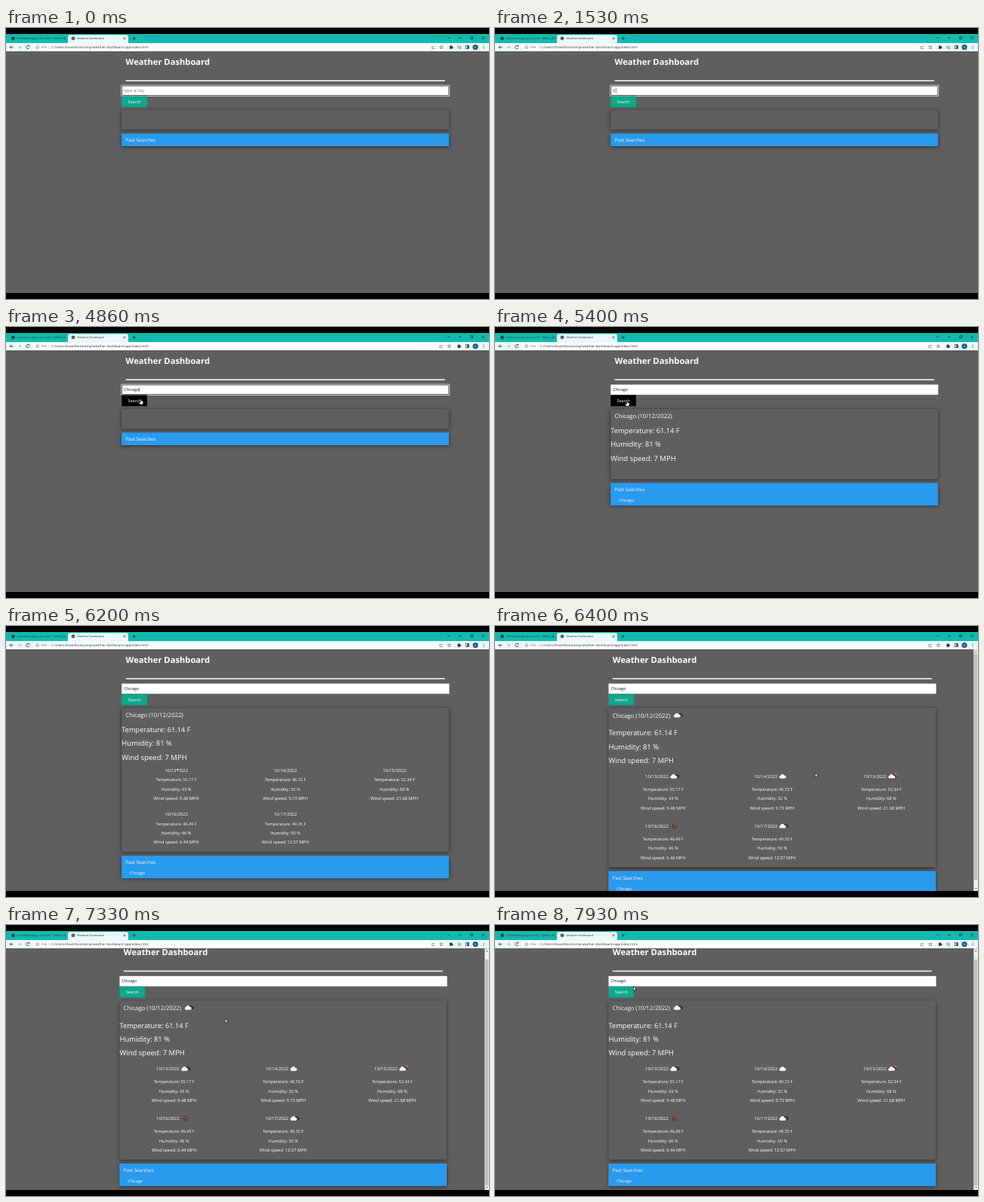
Write an HTML page with a canvas that moves like this. It is 640 by 360 pixels and loops after 8000 ms.

```html
<!DOCTYPE html>
<html lang="en">
<head>
<meta charset="utf-8">
<title>Weather Dashboard</title>
<style>
html, body { margin: 0; width: 100%; height: 100%; overflow: hidden; background: #000; }
canvas { display: block; width: 640px; height: 360px; }
</style>
</head>
<body>
<canvas id="stage" width="640" height="360"></canvas>
<script>
const ctx = document.getElementById('stage').getContext('2d');
const LOOP = 8000;
const PAGE = '#605f60', BLUE = '#2a9aee', TEAL = '#0ea88a', FRAME = '#13b9ae', BAR = '#ebf9f8', INK = '#333b3e';
const FONT = '"Open Sans", "Noto Sans", sans-serif';

// Times (ms) at which things happen
const KEYS = [1530, 2000, 2060, 2260, 3200, 3400, 3660];
const CARET = [530, 1060, 1530, 2800, 3200, 4260, 4790, 5400];
const HOVER = 4800, CLICK = 5400, FORECAST = 5730, ICONS = 6400;
const POINTER = [
  [4660, 198, 84], [4930, 175, 98], [5680, 175, 98], [6200, 226, 188],
  [6530, 526, 199], [6800, 526, 199], [7600, 206, 98], [7930, 183.5, 81.5]
];

const DAYS = [
  ['10/13/2022', '55.17', '43', '9.48', 'broken'],
  ['10/14/2022', '46.72', '32', '9.73', 'cloud'],
  ['10/15/2022', '52.34', '68', '21.68', 'rain'],
  ['10/16/2022', '46.49', '46', '6.44', 'clear'],
  ['10/17/2022', '49.35', '50', '12.57', 'broken']
];

const ease = p => p * p * (3 - 2 * p);
const clamp = p => Math.min(1, Math.max(0, p));

function rect(x, y, w, h, color) {
  ctx.fillStyle = color;
  ctx.fillRect(x, y, w, h);
}

function round(x, y, w, h, r, color) {
  ctx.fillStyle = color;
  ctx.beginPath();
  ctx.roundRect(x, y, w, h, r);
  ctx.fill();
}

function disc(x, y, r, color) {
  ctx.fillStyle = color;
  ctx.beginPath();
  ctx.arc(x, y, r, 0, Math.PI * 2);
  ctx.fill();
}

function ring(x, y, r, color, width = 0.7, from = 0, to = Math.PI * 2) {
  ctx.strokeStyle = color;
  ctx.lineWidth = width;
  ctx.beginPath();
  ctx.arc(x, y, r, from, to);
  ctx.stroke();
}

function trace(points) {
  ctx.beginPath();
  for (let i = 0; i < points.length; i += 2) ctx.lineTo(points[i], points[i + 1]);
}

function line(points, color = INK, width = 0.7) {
  ctx.strokeStyle = color;
  ctx.lineWidth = width;
  trace(points);
  ctx.stroke();
}

// y is the middle of the capitals
function text(str, x, y, size, color = '#fff', align = 'left', weight = 400) {
  ctx.font = `${weight} ${size}px ${FONT}`;
  ctx.textAlign = align;
  ctx.fillStyle = color;
  ctx.fillText(str, x, y + size * 0.36);
}

function card(x, y, w, h, color) {
  ctx.save();
  ctx.shadowColor = 'rgba(0,0,0,.3)';
  ctx.shadowOffsetY = 1.3;
  for (const blur of [3.3, 6.7]) {
    ctx.shadowBlur = blur;
    rect(x, y, w, h, color);
  }
  ctx.restore();
}

function cloud(x, y, s, color) {
  disc(x - 3 * s, y + 1 * s, 2.1 * s, color);
  disc(x - 0.5 * s, y - 0.5 * s, 2.8 * s, color);
  disc(x + 2.7 * s, y + 0.8 * s, 2.2 * s, color);
  rect(x - 3 * s, y + 0.5 * s, 5.8 * s, 2.6 * s, color);
}

function weatherIcon(kind, x, y) {
  if (kind === 'clear') {
    disc(x, y, 3.2, '#483f3c');
    disc(x + 0.4, y - 0.6, 2.1, '#80523a');
    return;
  }
  if (kind === 'broken') cloud(x + 3, y - 0.6, 0.75, '#2f2e30');
  if (kind === 'rain') {
    disc(x + 3, y - 2, 2.6, '#dc7440');
    cloud(x + 1.4, y - 0.8, 0.8, '#2b2d38');
  }
  cloud(x - 1, y, 0.9, '#f6f6f6');
  if (kind === 'rain') {
    for (const dx of [-2.5, 0, 2.5]) line([x + dx, y + 2.4, x + dx - 0.9, y + 4.6], '#2d4a90', 0.9);
  }
}

function drawBrowser(t) {
  rect(0, 8, 640, 12, FRAME);
  round(82, 9.3, 80, 12, [2.6, 2.6, 0, 0], BAR);
  rect(0, 20, 640, 11.3, BAR);

  disc(9.5, 13.8, 2.4, '#1d4446');
  ctx.save();
  ctx.beginPath();
  ctx.rect(14, 9, 60, 10);
  ctx.clip();
  text('scheduler/app.js at main · Nellow', 14.3, 13.8, 3.9, '#17494a');
  ctx.restore();
  line([75.8, 12.3, 78.8, 15.3], INK);
  line([78.8, 12.3, 75.8, 15.3], INK);

  disc(89, 13.8, 2.4, '#3f4648');
  line([87.6, 13, 89.2, 14, 88.8, 15.5], '#dfe8e8', 0.6);
  text('Weather Dashboard', 94.3, 13.8, 3.8, '#30383a');
  line([155.5, 12.3, 158.5, 15.3], INK);
  line([158.5, 12.3, 155.5, 15.3], INK);
  line([167.5, 13.8, 171.9, 13.8], '#123');
  line([169.7, 11.6, 169.7, 16], '#123');

  line([585, 12.4, 586.6, 14, 588.2, 12.4], '#123');
  line([600, 13.3, 603.5, 13.3], '#123');
  ctx.strokeRect(615.8, 11.8, 2.8, 2.8);
  line([630.6, 11.4, 634, 14.8], '#123');
  line([634, 11.4, 630.6, 14.8], '#123');

  line([9.6, 25.5, 5, 25.5], INK, 0.8);
  line([7.2, 23.3, 5, 25.5, 7.2, 27.7], INK, 0.8);
  line([15.6, 25.5, 20, 25.5], '#a4afb0', 0.8);
  line([17.9, 23.3, 20.1, 25.5, 17.9, 27.7], '#a4afb0', 0.8);
  ring(28.8, 25.5, 2.1, INK, 0.8, 0.3, 5.5);
  rect(29.7, 23, 1.5, 1.6, INK);

  const media = t < 3200 || t >= 6530;
  const shift = media ? -10.5 : 0;
  round(36, 21.4, 558 + shift, 8.3, 4.1, '#fff');
  ring(41.7, 25.5, 1.9, '#5b6365', 0.6);
  line([41.7, 25.2, 41.7, 26.6], '#5b6365', 0.6);
  text('File', 47, 25.5, 4.5, '#60686a');
  rect(56.8, 23.3, 0.5, 4.5, '#b4bbbc');
  text('C:/Users/Dovel/bootcamp/weather-dashboard-app/index.html', 60, 25.5, 4.45, '#2b3032');

  ctx.save();
  ctx.translate(shift, 0);
  line([576, 24.5, 574.8, 24.5, 574.8, 27.6, 578.3, 27.6, 578.3, 26.6], '#59686a', 0.6);
  line([575.9, 26.2, 576.6, 24.6, 579, 24.3], '#59686a', 0.6);
  const star = [];
  for (let i = 0; i <= 10; i++) {
    const a = i * Math.PI / 5 - Math.PI / 2, r = i % 2 ? 1.1 : 2.5;
    star.push(587.4 + r * Math.cos(a), 25.6 + r * Math.sin(a));
  }
  line(star, '#4b5658', 0.6);
  rect(598.4, 24, 3.6, 3.7, INK);
  disc(600.1, 23.8, 0.9, INK);
  disc(602.2, 25.8, 0.9, INK);
  ctx.restore();

  if (media) {
    for (const y of [24, 25.5, 27]) rect(598.2, y - 0.3, y > 26 ? 2 : 3.2, 0.6, '#566466');
    line([602.4, 23.7, 602.4, 27], '#566466', 0.6);
    disc(601.8, 27.2, 0.8, '#566466');
  }
  ctx.strokeStyle = INK;
  ctx.lineWidth = 0.7;
  ctx.strokeRect(609.2, 23.5, 4, 4);
  rect(611.2, 23.5, 2, 4, INK);
  disc(622, 25.5, 3.6, '#16568f');
  text('N', 622, 25.5, 3.8, '#e8f2fa', 'center');
  for (const y of [23.7, 25.5, 27.3]) disc(633, y, 0.55, INK);
}

function drawForm(t, x) {
  const typed = 'Chicago'.slice(0, KEYS.filter(k => t >= k).length);
  const focused = t < CLICK;
  rect(x, 76.5, 434, 13.6, '#fff');
  if (focused) {
    ctx.strokeStyle = '#fff';
    ctx.lineWidth = 0.7;
    ctx.strokeRect(x - 0.4, 76.1, 434.8, 14.2);
    ctx.strokeStyle = '#202020';
    ctx.strokeRect(x + 0.5, 77, 433, 12.5);
  } else {
    rect(x, 89.7, 434, 0.4, '#ccc');
  }
  if (typed) text(typed, x + 3, 83.2, 5.45, '#111');
  else text('type a city', x + 2.8, 83.2, 5.7, '#757575');
  if (CARET.filter(c => t >= c).length % 2) {
    ctx.font = `5.45px ${FONT}`;
    rect(x + 3.2 + ctx.measureText(typed).width, 80.2, 0.5, 6.2, '#000');
  }

  const hovered = t >= HOVER && t < 5800;
  rect(x, 90.4, 33.6, 14.8, hovered ? '#000' : TEAL);
  text('Search', x + 16.8, 98, 5.5, '#fff', 'center');
}

function drawForecast(x, icons) {
  const gaps = icons ? [0, 17, 29.4, 41.6] : [0, 12.5, 25, 37.2];
  DAYS.forEach(([date, temp, humidity, wind, kind], i) => {
    const cx = x + 72.3 + (i % 3) * 144.5;
    const row = i > 2 ? 1 : 0;
    const y = icons ? 200 + row * 66 : 192 + row * 58.2;
    text(date, icons ? cx - 8.3 : cx, y, 5.8, '#fff', 'center');
    if (icons) weatherIcon(kind, cx + 15, y - 0.3);
    text(`Temperature: ${temp} F`, cx, y + gaps[1], 5.5, '#fff', 'center');
    text(`Humidity: ${humidity} %`, cx, y + gaps[2], 5.7, '#fff', 'center');
    text(`Wind speed: ${wind} MPH`, cx, y + gaps[3], 5.7, '#fff', 'center');
  });
}

function drawScrollbar(scroll) {
  rect(634.3, 31.3, 5.7, 320.7, '#f1f1f1');
  rect(635, 37 + scroll, 4.3, 300.5, '#c1c1c1');
  ctx.fillStyle = '#505050';
  trace([635.8, 35.3, 637.2, 33.7, 638.6, 35.3]);
  ctx.fill();
  trace([635.8, 348, 637.2, 349.6, 638.6, 348]);
  ctx.fill();
}

function drawPage(t) {
  const stage = [CLICK, FORECAST, ICONS].filter(s => t >= s).length;
  const icons = stage === 3;
  const x = icons ? 150.5 : 153.3;
  const scroll = 8.7 * ease(clamp((t - 7000) / 200));
  const bottom = [135, 202, 300, 320.3][stage];

  ctx.save();
  ctx.beginPath();
  ctx.rect(0, 31.3, 640, 320.7);
  ctx.clip();
  rect(0, 31, 640, 321, PAGE);
  ctx.translate(0, -scroll);

  text('Weather Dashboard', x + 5.3, 44.8, 11.2, '#fff', 'left', 700);
  rect(x + 5.3, 69, 423, 1.9, '#dcdcdc');
  drawForm(t, x);

  card(x, 109, 433.5, bottom - 109, PAGE);
  if (stage) {
    text('Chicago (10/12/2022)', x + 5.3, icons ? 119 : 118, 7.75);
    if (icons) weatherIcon('broken', x + 92, 118.6);
    const y = icons ? 142 : 137.5;
    text('Temperature: 61.14 F', x, y, 9.25);
    text('Humidity: 81 %', x, y + 18.4, 9.5);
    text('Wind speed: 7 MPH', x, y + 36.7, 9.5);
  }
  if (stage > 1) drawForecast(x, icons);

  card(x, bottom + 5.3, 433.5, stage ? 29.8 : 16.7, BLUE);
  text('Past Searches', x + 5.3, bottom + 14, 6.2);
  if (stage) text('Chicago', x + 10.7, bottom + 28.4, 5.45);
  ctx.restore();

  if (icons) drawScrollbar(scroll);
}

function drawPointer(t) {
  if (t < POINTER[0][0]) return;
  let i = POINTER.findIndex(p => p[0] > t);
  if (i < 0) i = POINTER.length - 1;
  const [t0, x0, y0] = POINTER[i - 1], [t1, x1, y1] = POINTER[i];
  const p = ease(clamp((t - t0) / (t1 - t0)));
  ctx.save();
  ctx.translate(x0 + (x1 - x0) * p, y0 + (y1 - y0) * p);
  ctx.strokeStyle = '#000';
  ctx.lineWidth = 0.6;
  ctx.fillStyle = '#fff';
  if (t >= HOVER && t < 5800) {
    trace([-0.6, 0, 0.6, 0, 0.7, 2.4, 3.2, 3.1, 3.1, 5.6, 2.3, 7.2, -1, 7.2, -2.8, 4.5, -2.2, 3.8, -0.7, 4.7]);
  } else {
    trace([0, 0, 0, 5.6, 1.3, 4.5, 2.2, 6.4, 3.1, 6, 2.3, 4.1, 4, 4]);
  }
  ctx.closePath();
  ctx.fill();
  ctx.stroke();
  ctx.restore();
}

function draw() {
  const t = performance.now() % LOOP;
  ctx.textRendering = 'geometricPrecision';
  rect(0, 0, 640, 360, '#000');
  drawBrowser(t);
  drawPage(t);
  drawPointer(t);
  requestAnimationFrame(draw);
}
draw();
</script>
</body>
</html>
```
